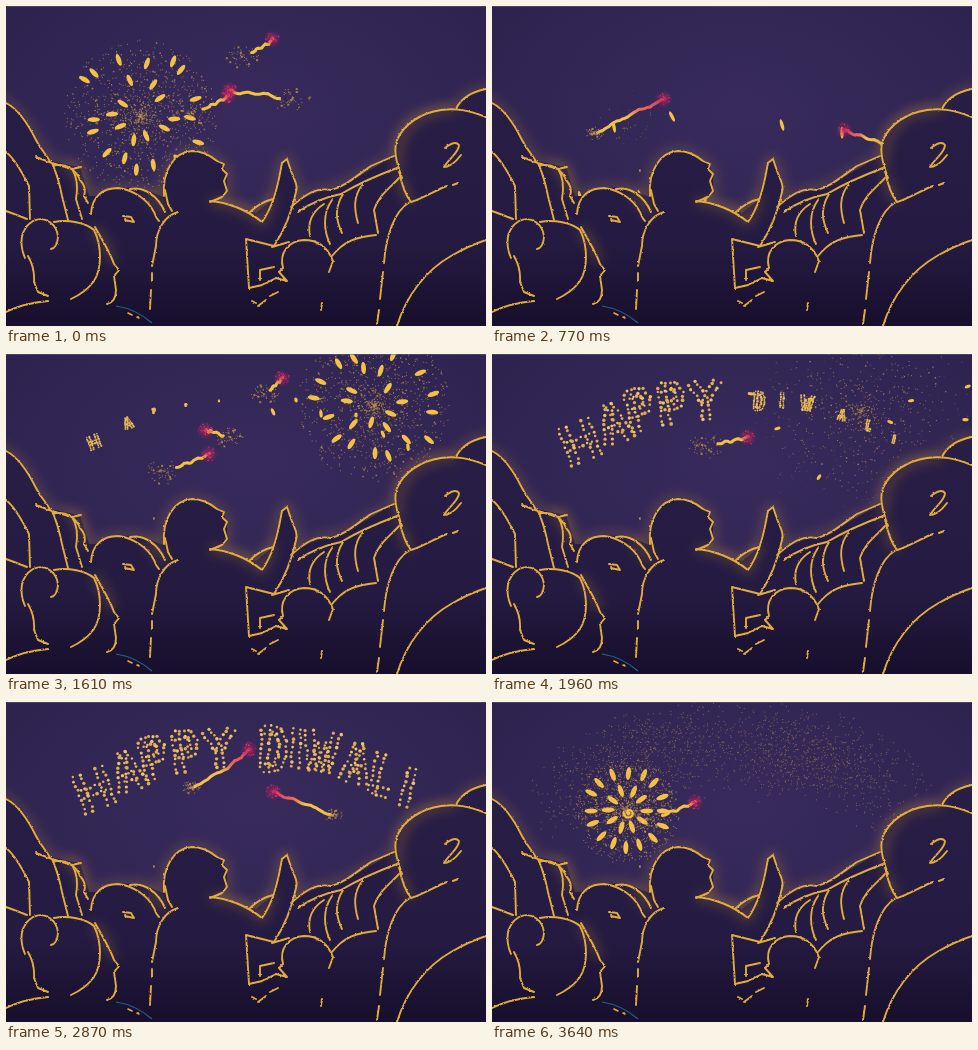
Recreate the animation shown at these times as an HTML page with a canvas. Size 480x320 px, loop 3.71 s.

```html
<!DOCTYPE html>
<html lang="en">
<head>
<meta charset="utf-8">
<title>Happy Diwali</title>
<style>
  html, body { margin: 0; width: 100%; height: 100%; overflow: hidden; background: #2d2250; }
  #stage {
    position: relative; width: 480px; height: 320px; overflow: hidden;
    background:
      radial-gradient(ellipse 310px 200px at 250px 105px, #382b5c 0, #33275500 100%),
      linear-gradient(#2d224e, #2e2350 60%, #1c1236);
  }
  canvas, svg { position: absolute; left: 0; top: 0; display: block; }
</style>
</head>
<body>
<div id="stage">
  <canvas id="sky" width="480" height="320"></canvas>
  <svg width="480" height="320" viewBox="0 0 480 320">
    <defs>
      <linearGradient id="night" x1="0" y1="80" x2="0" y2="320" gradientUnits="userSpaceOnUse">
        <stop offset="0" stop-color="#291e45"/>
        <stop offset=".65" stop-color="#251b42"/>
        <stop offset="1" stop-color="#170f2c"/>
      </linearGradient>
      <filter id="blur" x="-20%" y="-20%" width="140%" height="140%"><feGaussianBlur stdDeviation="6"/></filter>
      <filter id="chalk" x="0" y="0" width="480" height="320" filterUnits="userSpaceOnUse" color-interpolation-filters="sRGB">
        <feTurbulence type="fractalNoise" baseFrequency=".35" numOctaves="2" seed="4"/>
        <feDisplacementMap in="SourceGraphic" scale="2.2" xChannelSelector="R" yChannelSelector="G"/>
      </filter>
      <path id="crowd" d="M-20 85 L0 97C12 103 22 118 30 134L44 155 74 161 83 190 90 190C97 182 112 181 135 182
        L157 191C156 165 168 146 186 145C200 146 218 155 221 168V186L207 195 250 207 266 194 276 157 281 153 291 180
        286 201C304 184 325 184 340 178L388 150 391 134C398 115 420 103 450 103C455 92 465 86 480 83L500 80V350H-20Z"/>
    </defs>
    <use href="#crowd" fill="none" stroke="#c08a3c" stroke-width="7" opacity=".32" filter="url(#blur)"/>
    <use href="#crowd" fill="url(#night)"/>
    <g fill="none" stroke="#c98f3a" stroke-width="7" opacity=".32" filter="url(#blur)">
      <path d="M204 195Q235 198 256 216L268 190M392 165C389 115 420 104 450 103M394 170Q398 188 405 196M89 222Q100 238 107 256M140 186Q152 196 158 208M60 158Q74 166 78 188"/>
    </g>
    <path d="M110 300Q130 303 146 317" fill="none" stroke="#285f86" stroke-width="1.2"/>
    <g fill="none" stroke="#e2ac3c" stroke-width="1.9" stroke-linecap="round" stroke-linejoin="round" filter="url(#chalk)">
      <!-- far left -->
      <path d="M0 97C12 103 22 118 30 134C36 146 42 150 44 156M0 146C9 153 17 168 23 180L24 213M0 205Q11 209 21 213"/>
      <path d="M30 151L46 157C52 170 54 180 56 190L62 214M46 157L66 163 75 161M47 160C60 156 70 164 74 174Q81 181 78 190L82 197M66 163C72 172 72 182 70 193L76 213"/>
      <!-- child with a bun -->
      <path d="M19 252C13 238 14 223 27 215C40 209 51 219 52 231Q51 242 45 243M48 216C62 213 80 217 88 224C96 240 96 262 88 275Q80 286 65 293"/>
      <path d="M22 250Q29 262 28 276L32 286 42 290M89 221C96 234 104 246 108 258L113 264 108 270 110 284Q110 296 101 298M0 306Q18 297 42 295"/>
      <!-- second head -->
      <path d="M85 208C86 190 97 182 112 182C128 184 142 194 148 206Q150 212 153 215M124 183C138 180 152 190 159 206M117 210L125 211 128 216 119 214"/>
      <!-- boy with raised hand -->
      <path d="M158 190C156 165 168 146 186 145C196 145 205 150 211 155L218 158 216 163 221 168 218 175 221 185 216 191 204 196M159 184L162 198 166 205"/>
      <path d="M172 206C158 210 150 225 150 240L146 260M146 267V275M145 284L144 303M204 195C220 196 240 203 256 216C266 202 271 185 276 157L281 153 285 165C289 175 292 180 290 186C286 205 278 225 268 240L240 233 241 250 243 282M243 207Q254 196 267 193"/>
      <!-- child in front -->
      <path d="M277 262C273 247 282 235 298 234C312 234 322 242 327 255L323 266M266 241L283 236M277 262L273 266 281 275 270 272 256 279 243 282M254 274L254 264 268 261M252 300L260 294M264 290L272 286M316 297L315 304M246 295L250 297"/>
      <!-- hands -->
      <path d="M285 201C300 188 310 181 325 184C340 180 350 170 365 160L388 150M292 206Q310 193 335 188C355 176 375 168 391 162"/>
      <path d="M318 198C307 205 301 215 304 230M326 194C316 208 318 225 324 238M337 188C328 203 330 214 336 227M357 178C347 190 348 203 352 217M393 172C384 182 372 190 368 204L372 227M326 250C338 235 350 231 370 229"/>
      <!-- man on the right -->
      <path d="M396 172C391 158 387 145 391 134C398 118 415 107 435 104C450 102 462 104 480 111M450 103C455 92 465 86 480 83M439 142Q449 134 453 139C453 147 443 152 438 161Q446 161 455 149"/>
      <path d="M393 165C396 180 400 190 405 196C418 192 430 184 441 180M447 179L452 177M404 196C388 205 380 230 378 257M377 266L374 293M373 304L371 318M391 320C400 290 420 264 445 250Q462 240 480 234"/>
      <path d="M148 164V165M122 307L126 309M131 311L133 312" stroke-width="1.6"/>
    </g>
    <path d="M0 .5H480" stroke="#68617f" opacity=".5"/>
  </svg>
</div>
<script>
const LOOP = 3710, STEP = 70, TAU = Math.PI * 2;
const GOLD = '#f3c146', PALE = '#dfae50', PINK = '#c9215c';
const ctx = document.getElementById('sky').getContext('2d');

const rnd = n => { const v = Math.sin(n * 127.1 + 11.7) * 43758.5453; return v - Math.floor(v); };
const clamp = v => Math.max(0, Math.min(1, v));
const mix = (a, b, k) => a + (b - a) * k;

function speck(x, y, size, color, alpha = 1) {
  ctx.globalAlpha = alpha;
  ctx.fillStyle = color;
  ctx.fillRect(x - size / 2, y - size / 2, size, size);
  ctx.globalAlpha = 1;
}

function leaf(x, y, angle, len, width) {
  ctx.fillStyle = GOLD;
  ctx.beginPath();
  ctx.ellipse(x, y, len / 2, width / 2, angle, 0, TAU);
  ctx.fill();
}

// Rockets: keys are [time, head, tail], positions counted along the points.
const rockets = [
  { starts: [-600, 770, 2520], tint: true,
    pts: [[70, 150], [105, 126], [138, 108], [172, 93], [220, 66], [245, 46], [262, 37], [276, 24]],
    keys: [[-280, 0, 0], [0, 3, 1], [600, 6.3, 5], [700, 6.5, 6], [840, 7, 6.1], [980, 7, 7]] },
  { starts: [-600, 770, 2520], tint: true,
    pts: [[420, 150], [390, 137], [352, 124], [300, 102], [262, 88], [228, 86], [206, 77], [195, 76]],
    keys: [[-280, 0, 0], [0, 2, .9], [600, 5.2, 3.7], [700, 6, 4.7], [840, 6.6, 5.5], [980, 7, 7]] },
  { starts: [-1680, 0, 2030],
    pts: [[95, 180], [122, 157], [137, 145], [170, 113], [203, 100], [222, 90], [256, 83]],
    keys: [[1050, 0, 0], [1190, 2, 1.2], [1610, 4, 3], [1680, 5, 3.8], [1960, 6, 5.1], [2100, 6, 6]] }
];

function along(pts, s) {
  const i = Math.min(Math.floor(s), pts.length - 2), k = s - i;
  return [0, 1].map(c => mix(pts[i][c], pts[i + 1][c], k));
}

function drawRocket({ pts, keys, tint }, age, seed) {
  const i = keys.findIndex(k => k[0] > age) - 1;
  if (i < 0) return;
  const [a, b] = [keys[i], keys[i + 1]], k = (age - a[0]) / (b[0] - a[0]);
  const hs = mix(a[1], b[1], k), ts = mix(a[2], b[2], k);
  const [hx, hy] = along(pts, hs), [tx, ty] = along(pts, ts);
  const early = tint && age < 400;

  const color = ctx.createLinearGradient(tx, ty, hx, hy);
  color.addColorStop(0, GOLD);
  color.addColorStop(early ? .45 : .85, GOLD);
  color.addColorStop(early ? .65 : 1, early ? '#ea6a58' : '#ec9a42');
  if (early) color.addColorStop(1, '#dd3d66');
  ctx.strokeStyle = color;
  ctx.lineWidth = 3;
  ctx.beginPath();
  for (let n = 0; n <= 24; n++) {
    const [x, y] = along(pts, mix(ts, hs, n / 24));
    ctx.lineTo(x + rnd(n + seed) * .8, y + Math.sin(n * .75) + rnd(n * 3 + seed) * .8);
  }
  ctx.stroke();

  const len = Math.hypot(hx - tx, hy - ty) || 1;
  const back = early ? 3 : Math.min(12, len * .4), spread = early ? 8 : Math.min(16, 8 + len * .25);
  const cx = tx - (hx - tx) / len * back, cy = ty - (hy - ty) / len * back;
  for (let n = 0; n < 55; n++) {
    const r = spread * rnd(n + seed + age), t = TAU * rnd(n * 7 + seed);
    speck(cx + Math.cos(t) * r * 1.2, cy + Math.sin(t) * r * .8, n % 9 ? 1 : 2, '#c99a45', .7);
  }

  const glow = ctx.createRadialGradient(hx, hy, 0, hx, hy, 9);
  glow.addColorStop(0, 'rgba(201,33,92,.65)');
  glow.addColorStop(1, 'rgba(201,33,92,0)');
  ctx.fillStyle = glow;
  ctx.fillRect(hx - 9, hy - 9, 18, 18);
  for (let n = 0; n < 30; n++) {
    const r = 7.5 * rnd(n * 5 + age), t = TAU * rnd(n + age + seed);
    speck(hx + Math.cos(t) * r, hy + Math.sin(t) * r, 1.2, n % 3 ? PINK : '#e0457a', .8);
  }
}

// Bursts
const bursts = [
  { x: 135, y: 108, start: -140, seed: 3 },
  { x: 368, y: 49, start: 1470, seed: 40 },
  { x: 135, y: 108, start: 3570, seed: 3 }
];

function drawBurst({ x, y, start, seed }, t) {
  const age = t - start;
  if (age < 0 || age > 1100) return;
  const R = 120 * (1 - Math.exp(-age / 200)) + (age <= 70 ? 5 : 0);

  for (let n = 0; n < 1100; n++) {
    const f = rnd(n + seed), a = TAU * rnd(n * 3 + seed), r = R * f * mix(1.35, 1.05, clamp(age / 500));
    const left = clamp((350 + 650 * (1 - f) * rnd(n * 9) + 200 * rnd(n * 4) - age) / 150);
    if (left) speck(x + Math.cos(a) * r, y + Math.sin(a) * r + age * .015,
      rnd(n * 2) < .9 ? 1 : 1.5, '#c4964a', .7 * left);
  }

  for (let n = 0; n < 26; n++) {
    const outer = n < 16, wob = age > 100 ? 1 : .3;
    if (age > 350 + 400 * rnd(n + seed)) continue;
    const a = (outer ? n / 16 : (n - 16) / 10) * TAU + .15 + seed + (rnd(n + seed) - .5) * .3 * wob;
    const r = R * (outer ? .93 + (rnd(n * 5 + seed) - .5) * .34 * wob : .46 + (rnd(n * 8 + seed) - .5) * .3 * wob);
    const size = clamp(1.15 - age / 650);
    leaf(x + Math.cos(a) * r, y + Math.sin(a) * r, a + (rnd(n * 6) - .5) * .5 * wob, 2 + 11 * size, 2 + 3 * size);
  }

  if (age <= 70) {
    ctx.strokeStyle = GOLD;
    ctx.lineWidth = 2.2;
    ctx.beginPath();
    for (let n = 0; n < 30; n++) ctx.lineTo(x + 2 + Math.cos(n * .33) * n * .19, y + 3 + Math.sin(n * .33) * n * .19);
    ctx.stroke();
  }
}

// Lettering
const glyphs = {
  H: '-1,-1 -1,1|1,-1 1,1|-1,0 1,0',
  A: '-1,1 0,-1 1,1|-.5,.3 .5,.3',
  P: '-.8,1 -.8,-1 .5,-1 .9,-.5 .5,0 -.8,0',
  Y: '-1,-1 0,0 1,-1|0,0 0,1',
  D: '-.8,-1 -.8,1 .3,1 .9,.4 .9,-.4 .3,-1 -.8,-1',
  I: '0,-1 0,1',
  W: '-1,-1 -.5,1 0,-.4 .5,1 1,-1',
  L: '-.7,-1 -.7,1 .9,1'
};

// char, x, y, tilt in degrees, half width, launch, growth start
const letters = [
  ['H', 88, 88, -20, 12, 760, 1490], ['A', 122, 69, -18, 12, 520, 1510],
  ['P', 148, 57, -14, 10, 760, 1570], ['P', 180, 51, -8, 10, 520, 1590],
  ['Y', 213, 47, -3, 13, 760, 1600], ['D', 267, 47, 2, 10, 1100, 1815],
  ['I', 290, 46, 3, 8, 560, 1825], ['W', 315, 49, 6, 14, 1100, 1830],
  ['A', 350, 61, 10, 10, 560, 1865], ['L', 377, 71, 14, 9, 1100, 1870],
  ['I', 402, 85, 15, 8, 1100, 1885]
].map(([char, x, y, tilt, w, launch, grow], i) => ({ x, y, launch, grow, i, dots: dotsFor(char, tilt, w, i) }));

function dotsFor(char, tilt, w, seed) {
  const out = [], c = Math.cos(tilt * TAU / 360), s = Math.sin(tilt * TAU / 360);
  for (const stroke of glyphs[char].split('|')) {
    const p = stroke.split(' ').map(q => q.split(',').map(Number)).map(([x, y]) => [x * w, y * 19]);
    for (let i = 1; i < p.length; i++) {
      const dx = p[i][0] - p[i - 1][0], dy = p[i][1] - p[i - 1][1];
      const len = Math.hypot(dx, dy), count = Math.max(1, Math.round(len / 5));
      for (let n = 0; n <= count; n++) for (const side of [-3.8, 3.8]) {
        const id = out.length + seed * 90;
        const x = p[i - 1][0] + dx * n / count - dy / len * side + (rnd(id) - .5) * 2;
        const y = p[i - 1][1] + dy * n / count + dx / len * side + (rnd(id + .5) - .5) * 2;
        out.push([x * c - y * s, x * s + y * c, 1.15 + rnd(id * 3) * .7]);
      }
    }
  }
  return out;
}

function drawLetter({ x, y, launch, grow, i, dots }, t) {
  if (t < launch) return;
  if (t < grow) {
    const p = clamp((t - launch) / 700), left = 1 - p;
    leaf(x, mix(195, y, 1 - left * left), 1.4 + (rnd(i) - .7) * .5, 5 + 10 * left, 3.4);
    return;
  }
  const k = clamp((t - grow) / 350), gone = clamp((t - 3340) / 300);
  dots.forEach(([dx, dy, r], n) => {
    if (gone) {
      for (let m = 0; m < 4; m++) {
        const id = n * 4 + m + i * 500, a = TAU * rnd(id), d = 34 * gone * Math.sqrt(rnd(id * 3));
        speck(x + dx + Math.cos(a) * d, y + dy + Math.sin(a) * d, mix(2, 1, gone), '#c4964a', mix(1, .5, gone));
      }
      return;
    }
    ctx.fillStyle = n % 3 ? PALE : '#ecc565';
    ctx.beginPath();
    ctx.arc(x + dx * k, y + dy * k, r * mix(.45, 1, k), 0, TAU);
    ctx.fill();
  });
}

function draw(t) {
  ctx.clearRect(0, 0, 480, 320);
  ctx.lineCap = ctx.lineJoin = 'round';
  bursts.forEach(b => drawBurst(b, t));
  letters.forEach(l => drawLetter(l, t));
  rockets.forEach((r, i) => r.starts.forEach(s => drawRocket(r, t - s, i * 31)));
}

const origin = performance.now();
let shown = -1;
function tick() {
  const t = Math.floor(((performance.now() - origin) % LOOP) / STEP) * STEP;
  if (t !== shown) draw(shown = t);
  requestAnimationFrame(tick);
}
tick();
</script>
</body>
</html>
```
